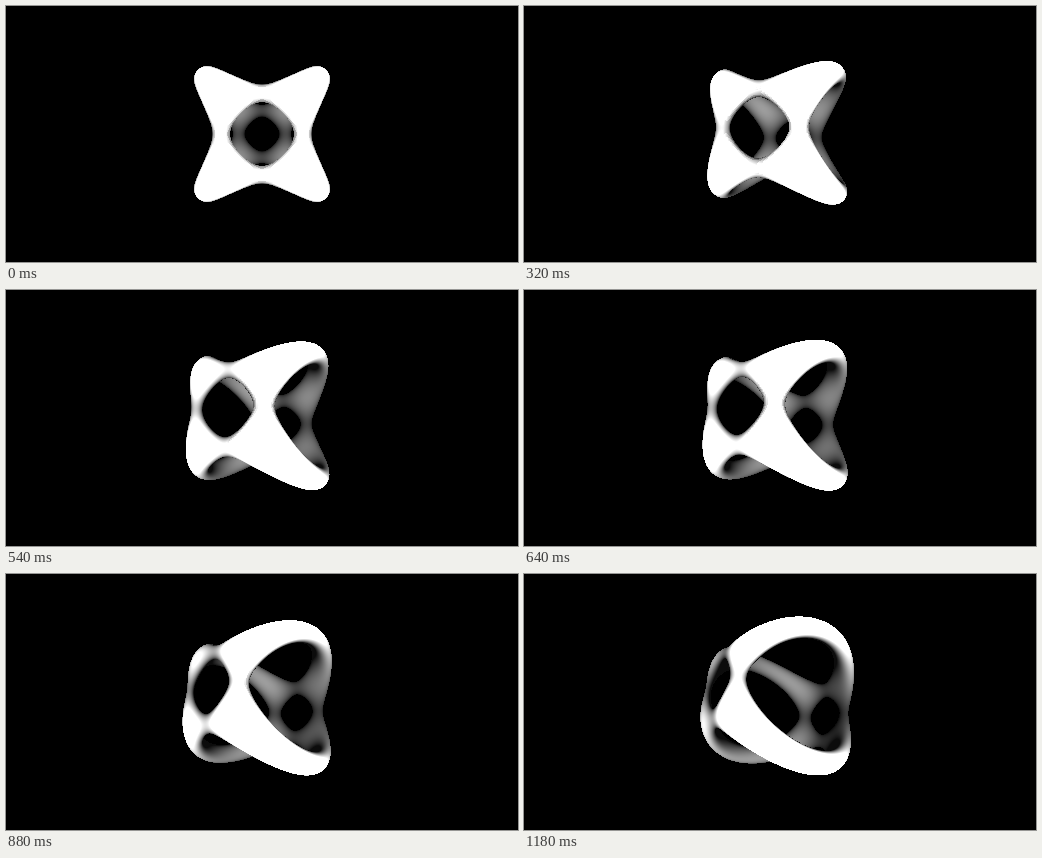
Write an HTML page with a canvas that moves like this. It is 512 px wide and 256 px high and loops after 1200 ms.

```html
<!DOCTYPE html>
<html lang="en">
<head>
<meta charset="utf-8">
<title>Turning ring shell</title>
<style>
html, body { margin: 0; width: 100%; height: 100%; overflow: hidden; background: #000; }
canvas { display: block; width: 512px; height: 256px; }
</style>
</head>
<body>
<canvas id="stage" width="512" height="256"></canvas>
<script>
const ctx = document.getElementById('stage').getContext('2d');

// timing
const LOOP = 1200, STEP = 20;
const TURN = 55 * Math.PI / 180 / 1180;   // radians per ms

// camera and drawn region
const EYE = 3.7, FOCAL = 234, CX = 256, CY = 128, BOUND = 1.45;
const BOX = { x: 168, y: 32, w: 178, h: 182 };

// in-plane direction the front moves to, and its perpendicular
const MX = -0.956, MY = 0.292, UX = 0.292, UY = 0.956;

// surface: two crossed bands on an ellipsoid, pierced at both poles
const SIZE = 1.53, FLAT = 1.31, SHELL = 1.7, LEVEL = 0.17;
const POLE = 0.278, SPREAD = 0.211;

// light: gain at the centre and its growth toward the viewer
const GAIN = 125, FADE = 0.75, AMBIENT = 12;

function pole(rho2) {
  const q = rho2 / SPREAD;
  return q > 8 ? 0 : POLE * Math.exp(-q);
}

function field(x, y, z) {
  const xx = x * x, yy = y * y;
  const a = xx + yy + FLAT * z * z - SIZE;
  const d = xx - yy;
  return SHELL * a * a + d * d + pole(xx + yy) - LEVEL;
}

// slope of the field toward the viewer
function slope(x, y, z, c, s) {
  const rho2 = x * x + y * y, d = 4 * (x * x - y * y);
  const a = 4 * SHELL * (rho2 + FLAT * z * z - SIZE);
  const p = -2 * pole(rho2) / SPREAD;
  const gx = x * (a + d + p);
  const gy = y * (a - d + p);
  const gz = a * FLAT * z;
  return Math.max(0, gz * c - (gx * MX + gy * MY) * s);
}

// brightness seen along one ray, or 0 where it misses
function trace(vx, vy, c, s) {
  const len2 = vx * vx + vy * vy + 1;
  const disc = EYE * EYE - len2 * (EYE * EYE - BOUND * BOUND);
  if (disc <= 0) return 0;
  const root = Math.sqrt(disc);
  let t = (EYE - root) / len2;
  const end = (EYE + root) / len2;

  // eye and ray in the solid's own axes
  const vm = vx * MX + vy * MY, vu = vx * UX + vy * UY;
  const em = -EYE * s, ez = EYE * c;
  const dm = vm * c + s, dz = vm * s - c;
  const ex = em * MX, ey = em * MY;
  const dx = dm * MX + vu * UX, dy = dm * MY + vu * UY;
  const at = k => field(ex + dx * k, ey + dy * k, ez + dz * k);

  let step = 0;
  while (t < end) {
    const f = at(t);
    if (f < 0) {
      let lo = t - step, hi = t;
      for (let i = 0; i < 6; i++) {
        const mid = (lo + hi) / 2;
        if (at(mid) < 0) hi = mid; else lo = mid;
      }
      const n = slope(ex + dx * hi, ey + dy * hi, ez + dz * hi, c, s);
      return Math.min(255, AMBIENT + GAIN * Math.exp(FADE * (EYE - hi)) * n);
    }
    step = 0.012 + 0.16 * f;
    t += step;
  }
  return 0;
}

function render(ms) {
  const img = ctx.createImageData(BOX.w, BOX.h);
  const c = Math.cos(ms * TURN), s = Math.sin(ms * TURN);
  let i = 0;
  for (let py = 0; py < BOX.h; py++) {
    const vy = (CY - BOX.y - py - 0.5) / FOCAL;
    for (let px = 0; px < BOX.w; px++, i += 4) {
      const v = trace((BOX.x + px + 0.5 - CX) / FOCAL, vy, c, s);
      img.data[i] = img.data[i + 1] = img.data[i + 2] = v;
      img.data[i + 3] = 255;
    }
  }
  return img;
}

const cache = [];
let shown = -1;

function draw(now) {
  const k = Math.floor((now % LOOP) / STEP);
  if (k !== shown) {
    cache[k] = cache[k] || render(k * STEP);
    ctx.putImageData(cache[k], BOX.x, BOX.y);
    shown = k;
  }
}

ctx.fillStyle = '#000';
ctx.fillRect(0, 0, 512, 256);
const start = performance.now();
function tick() {
  draw(performance.now() - start);
  requestAnimationFrame(tick);
}
tick();
</script>
</body>
</html>
```
